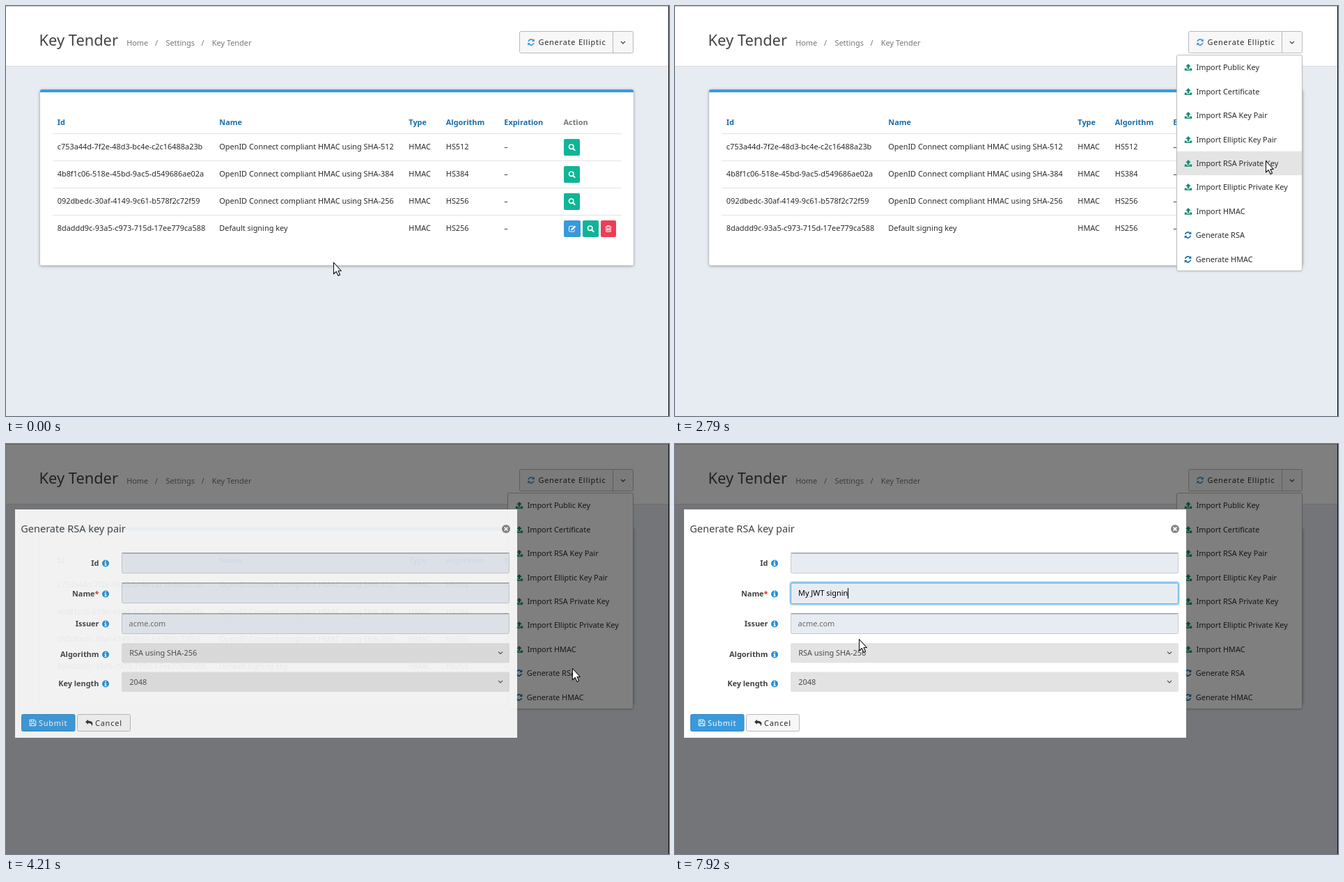
Write an HTML page that moves like this. It is 952x589 px and loops after 8 s.

```html
<!DOCTYPE html>
<html lang="en">
<head>
<meta charset="utf-8">
<title>Key Tender</title>
<style>
  html, body { margin: 0; width: 100%; height: 100%; overflow: hidden; background: #e7ecf2; }
  svg { display: block; width: 952px; height: 589px; }
  text { font: 10.92px "Noto Sans", sans-serif; fill: #2b2b2b; white-space: pre; }
  .title { font-size: 21.84px; fill: #424242; }
  .crumb { fill: #777; }
  .head { font-weight: 700; fill: #1b6ca8; }
  .spaced { letter-spacing: .8px; }
  .label { font-weight: 700; fill: #424242; text-anchor: end; }
  .field { fill: #666; }
  .option { fill: #484848; }
  .line { fill: none; stroke: currentColor; }
  .card { filter: drop-shadow(0 1px 2px rgba(0, 0, 0, .38)); }
  .menu { filter: drop-shadow(0 1px 1px rgba(0, 0, 0, .1)); }
</style>
</head>
<body>
<svg id="stage" viewBox="0 0 952 589" xmlns="http://www.w3.org/2000/svg"></svg>
<script>
const LOOP = 8000;
const BLUE = '#3a99dc', TEAL = '#10b595', RED = '#ee3e56';

const rect = (x, y, w, h, fill, extra = '') =>
  `<rect x="${x}" y="${y}" width="${w}" height="${h}" fill="${fill}" ${extra}/>`;
const text = (x, y, value, cls = '') => `<text x="${x}" y="${y}" class="${cls}">${value}</text>`;
const box = (x, y, w, h, fill, stroke) =>
  rect(x + .5, y + .5, w - 1, h - 1, fill, `stroke="${stroke}" rx="2"`);

// Icons are drawn around their own centre.
const ICONS = {
  refresh: `<path class="line" stroke-width="1.7" d="M-3.9-.9A4 4 0 0 1 3-2.7M3.9.9A4 4 0 0 1-3 2.7"/>
    <path fill="currentColor" d="M4.8-4.9V-1H.9ZM-4.8 4.9V1H-.9Z"/>`,
  upload: `<path fill="currentColor" d="M0-5 3.8-1H1.4V2.2H-1.4V-1H-3.8Z
    M-5.2 1.6H-2.3V3.2H2.3V1.6H5.2V4.8H-5.2Z"/>`,
  search: `<circle class="line" cx="-.8" cy="-.8" r="3.2" stroke-width="1.6"/>
    <path class="line" stroke-width="1.9" stroke-linecap="round" d="M1.8 1.8 4.2 4.2"/>`,
  edit: `<path class="line" d="M1.5-3.7H-3.2Q-4.5-3.7-4.5-2.4V2.8Q-4.5 4.1-3.2 4.1H2Q3.3 4.1 3.3 2.8V1.2"/>
    <path fill="currentColor" d="M3.4-4.6 5.2-2.8.3 2H-1.6V.2Z"/>`,
  trash: `<path class="line" d="M-4.3-3H4.3M-1.5-3.2V-4.5H1.5V-3.2M-3.2-2.6V4.2H3.2V-2.6M-1.4-1V2.7M0-1V2.7M1.4-1V2.7"/>`,
  save: `<path class="line" d="M-4.3-4.3H2.5L4.3-2.5V4.3H-4.3ZM-2.3-4V-1.3H1.6V-4M-2.5 4V1H2.5V4"/>`,
  reply: `<path fill="currentColor" d="M-5.2-1.2-1.4-4.8V-2.8C3.2-2.8 5.2-1.2 5.2 1.4 5.2 2.9 4.6 3.8 3.6 4.6
    4.2 1.5 2.8.5-1.4.5V2.5Z"/>`,
  info: `<circle r="5" fill="currentColor"/>
    <path fill="#fff" d="M-.9-3.7H.8V-2.2H-.9ZM-1.6-1.2H.8V2.1H1.6V3.3H-1.6V2.1H-.8V-.1H-1.6Z"/>`,
  close: `<circle r="6" fill="currentColor"/>
    <path stroke="#fff" stroke-width="1.9" d="M-2.4-2.4 2.4 2.4M2.4-2.4-2.4 2.4"/>`,
  chevron: `<path class="line" stroke-width="1.2" d="M-3-1.5 0 1.5 3-1.5"/>`
};
const icon = (name, x, y, color) =>
  `<g transform="translate(${x} ${y})" style="color:${color}">${ICONS[name]}</g>`;
const iconButton = (name, x, y, w, color) =>
  rect(x, y, w, 24, color, 'rx="2"') + icon(name, x + w / 2, y + 12, '#fff');

const COLUMNS = [73.7, 306.3, 578.3, 631.8, 715.3, 800.5];
const HEADS = ['Id', 'Name', 'Type', 'Algorithm', 'Expiration', 'Action'];
const COMPLIANT = 'OpenID Connect compliant HMAC using SHA-';
const ROWS = [
  ['c753a44d-7f2e-48d3-bc4e-c2c16488a23b', COMPLIANT + '512', 'HMAC', 'HS512', '–'],
  ['4b8f1c06-518e-45bd-9ac5-d549686ae02a', COMPLIANT + '384', 'HMAC', 'HS384', '–'],
  ['092dbedc-30af-4149-9c61-b578f2c72f59', COMPLIANT + '256', 'HMAC', 'HS256', '–'],
  ['8daddd9c-93a5-c973-715d-17ee779ca588', 'Default signing key', 'HMAC', 'HS256', '–']
];
const ROW_TOP = 183, ROW_HEIGHT = 39;

const MENU = ['Import Public Key', 'Import Certificate', 'Import RSA Key Pair',
  'Import Elliptic Key Pair', 'Import RSA Private Key', 'Import Elliptic Private Key',
  'Import HMAC', 'Generate RSA', 'Generate HMAC'];
const ITEM_TOP = 71, ITEM_HEIGHT = 34.43;

function header() {
  return rect(0, 0, 952, 86, '#fff') + rect(0, 86, 952, 1, '#d9dce0') + rect(0, 0, 952, 1, '#c9c9c9')
    + text(47.6, 57, 'Key Tender', 'title')
    + [[173.2, 'Home'], [214, '/'], [229.4, 'Settings'], [280.5, '/'], [295.8, 'Key Tender']]
      .map(([x, word]) => text(x, 57, word, 'crumb')).join('')
    + box(737, 36, 164, 32, '#f7f7f7', '#b9b9b9') + rect(871, 37, 1, 30, '#b9b9b9')
    + icon('refresh', 754, 52, BLUE) + text(764.4, 56, 'Generate Elliptic', 'spaced')
    + icon('chevron', 886, 52.3, '#333');
}

function table() {
  const heads = HEADS.map((name, i) =>
    `<text x="${COLUMNS[i]}" y="171" class="head"${i === 5 ? ' style="fill:#777"' : ''}>${name}</text>`).join('');
  const rows = ROWS.map((cells, r) => {
    const top = ROW_TOP + r * ROW_HEIGHT;
    const actions = r < 3 ? iconButton('search', 801, top + 8, 23, TEAL)
      : iconButton('edit', 801, top + 8, 24, BLUE) + iconButton('search', 828, top + 8, 23, TEAL)
        + iconButton('trash', 854, top + 8, 22, RED);
    return rect(67, top, 816, 1, '#e2e2e2')
      + cells.map((cell, i) => text(COLUMNS[i], top + 23, cell)).join('') + actions;
  }).join('');
  return `<g class="card">${rect(49, 120, 852, 252.5, '#fff', 'rx="2"')}</g>`
    + `<path fill="${BLUE}" d="M49 124V122Q49 120 51 120H899Q901 120 901 122V124Z"/>`
    + rect(67, 0, 816, ROW_HEIGHT, '#f5f5f5', 'id="rowHover"') + heads + rows;
}

function menu() {
  const items = MENU.map((name, i) => {
    const y = Math.round(88.3 + i * ITEM_HEIGHT), imports = i < 7;
    return icon(imports ? 'upload' : 'refresh', imports ? 737 : 736.5, y, imports ? '#128a70' : '#1b6ca8')
      + text(imports ? 748.5 : 747.8, y + 4, name);
  }).join('');
  return `<g id="menu"><g class="menu">${box(720, 70, 181, 311, '#fff', '#bdbdbd')}</g>`
    + rect(721, 0, 179, ITEM_HEIGHT, '#e4e4e4', 'id="itemHover"') + items + '</g>';
}

function input(y) {
  return box(166, y, 557, 30, '#e7ecf3', '#c6cad0')
    + rect(167, y + 1, 555, 1, '#c3c8cf') + rect(166.5, y, 556, 1, '#9a9da1');
}

function select(y, value) {
  return rect(166, y, 557, 28.5, '#e3e3e3', 'rx="2"')
    + text(177.3, y + 18, value, 'option') + icon('chevron', 710, y + 14, '#555');
}

function dialog() {
  const labels = [['Id', 171], ['Name<tspan fill="#e02b3c">*</tspan>', 215], ['Issuer', 258],
    ['Algorithm', 302], ['Key length', 344]];
  return '<g id="dialog">' + rect(13, 94, 721, 328, '#fff')
    + '<text x="21.3" y="126.5" style="font-size:14.5px;fill:#424242">Generate RSA key pair</text>'
    + icon('close', 718, 122, '#858585')
    + labels.map(([name, y]) => text(133.5, y + 4, name, 'label') + icon('info', 143, y + .5, '#2391d3')).join('')
    + input(156) + input(199) + input(243)
    + '<g id="focus">' + rect(165.5, 198.5, 558, 32, 'none', 'rx="3" stroke="#a9d5f3" stroke-width="2.6"')
    + box(166, 199, 557, 31, '#e7ecf3', '#62b0e4') + rect(167.5, 200, 554, 1, '#c3d3e2') + '</g>'
    + '<text id="typed" x="177" y="218" style="fill:#000"></text>'
    + rect(0, 207, 1, 15, '#000', 'id="caret"')
    + text(176.6, 262, 'acme.com', 'field')
    + select(286, 'RSA using SHA-256') + select(327.5, '2048')
    + box(22, 388, 77.5, 25, BLUE, '#2f89c8') + icon('save', 38.5, 400.5, '#fff')
    + '<text x="47" y="405" class="spaced" style="fill:#fff">Submit</text>'
    + box(102, 388, 77, 25, '#f7f7f7', '#bbb') + icon('reply', 119.2, 400.5, '#333')
    + text(128, 405, 'Cancel', 'spaced') + '</g>';
}

const POINTERS = `<g id="pointer">
  <path id="arrow" fill="#fff" stroke="#111" stroke-width="1.1" stroke-linejoin="round"
    d="M.5.5V17L4.3 13.5 7 19.4 9.6 18.3 7 12.5H11.4Z"/>
  <path id="hand" fill="#fff" stroke="#111" stroke-width="1.2" stroke-linejoin="round"
    d="M-1.7 10.5V1.7A1.7 1.7 0 0 1 1.7 1.7V7Q3.6 6.3 4.7 7.6 6.6 7 7.5 8.4 10.6 8 10.6 10.6V13
      Q10.6 15 9.2 16.6V18.6H.4V16.6Q-3 13.6-5 10.8C-6 9-4 8.2-2.9 9.3Z"/>
  <path id="beam" fill="none" stroke="#111" stroke-width="1.2"
    d="M-3-7.5H-1Q0-7.5 0-6.5V6.5Q0 7.5-1 7.5H-3M3-7.5H1Q0-7.5 0-6.5M3 7.5H1Q0 7.5 0 6.5"/>
</g>`;

document.getElementById('stage').innerHTML = rect(0, 0, 952, 589, '#e7ecf2')
  + header() + table() + menu() + rect(0, 0, 951, 589, '#000', 'id="shade"') + dialog()
  + rect(951, 0, 1, 589, '#111') + POINTERS;

const part = Object.fromEntries(
  [...document.querySelectorAll('#stage [id]')].map(node => [node.id, node]));
const show = (node, on) => node.setAttribute('visibility', on ? 'inherit' : 'hidden');
const ramp = (t, from, to) => Math.min(1, Math.max(0, (t - from) / (to - from)));
const ease = p => p * p * (3 - 2 * p);

// [time, x, y] stops of the pointer
const PATH = [[0, 470, 368], [360, 470, 368], [1040, 838, 166], [1190, 838, 166], [1630, 891, 62],
  [1920, 891, 55], [2270, 891, 55], [3080, 830, 291], [3460, 813, 322], [4220, 813, 322],
  [4650, 300, 258], [5100, 258, 215], [5500, 258, 215]];

function pointerAt(t) {
  if (t >= 5500) return [264, 280];
  const i = PATH.findIndex(stop => stop[0] > t);
  const [t0, x0, y0] = PATH[i - 1], [t1, x1, y1] = PATH[i];
  const p = ease(ramp(t, t0, t1));
  return [x0 + (x1 - x0) * p, y0 + (y1 - y0) * p];
}

const TYPING = [[6170, 'M'], [6380, 'y'], [6580, ' '], [6920, 'J'], [7020, 'WT'], [7130, ' '],
  [7380, 's'], [7450, 'i'], [7540, 'g'], [7620, 'n'], [7750, 'i'], [7920, 'n']];

function render(t) {
  const [x, y] = pointerAt(t);
  const menuOpen = t >= 2040, modal = t >= 4170;

  const overButton = !modal && x > 737 && x < 901 && y > 36 && y < 68;
  const overInput = modal && x > 166 && x < 723 && [156, 199, 243].some(top => y > top && y < top + 30);
  part.pointer.setAttribute('transform', `translate(${Math.round(x)} ${Math.round(y)})`);
  show(part.hand, overButton);
  show(part.beam, overInput);
  show(part.arrow, !overButton && !overInput);

  const row = Math.floor((y - ROW_TOP) / ROW_HEIGHT);
  show(part.rowHover, !menuOpen && row >= 0 && row < ROWS.length && x > 67 && x < 883);
  part.rowHover.setAttribute('y', ROW_TOP + row * ROW_HEIGHT);

  const item = Math.floor((y - ITEM_TOP) / ITEM_HEIGHT);
  show(part.menu, menuOpen);
  show(part.itemHover, menuOpen && !modal && item >= 0 && item < MENU.length);
  part.itemHover.setAttribute('y', ITEM_TOP + item * ITEM_HEIGHT);

  part.shade.setAttribute('opacity', .5 * ramp(t, 4050, 4135));
  part.dialog.setAttribute('opacity', ramp(t, 4070, 4226));
  part.focus.setAttribute('opacity', ramp(t, 5270, 5420));

  part.typed.textContent = TYPING.filter(step => step[0] <= t).map(step => step[1]).join('');
  show(part.caret, t >= 5280);
  part.caret.setAttribute('x', Math.floor(177.4 + part.typed.getComputedTextLength()));
}

const start = performance.now();
function tick() {
  render((performance.now() - start) % LOOP);
  requestAnimationFrame(tick);
}
tick();
</script>
</body>
</html>
```
